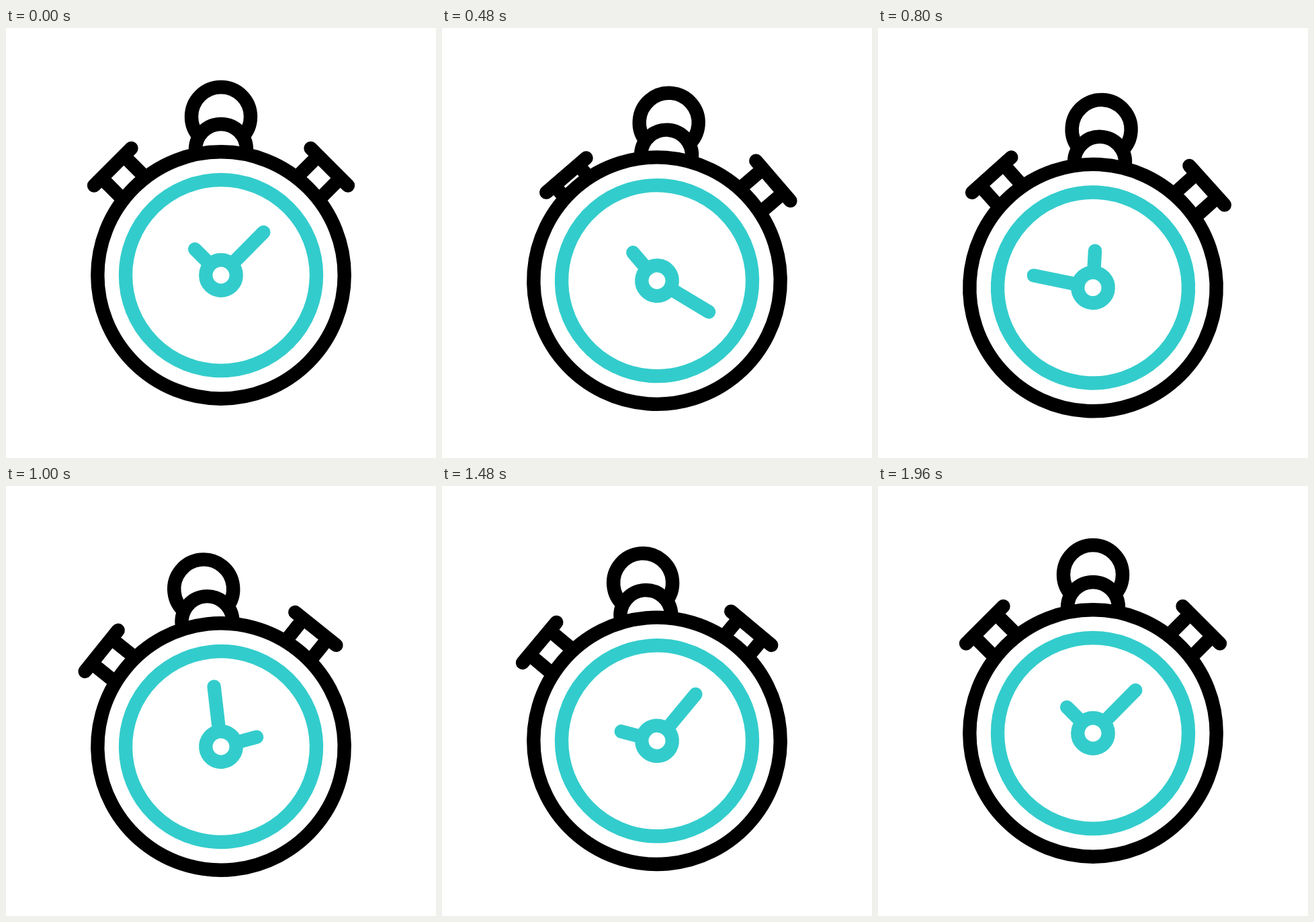
Recreate the animation shown at these times as an HTML page with a canvas. Size 640 px wide and 640 px high, loop 2000 ms.

```html
<!DOCTYPE html>
<html lang="en">
<head>
<meta charset="utf-8">
<title>Stopwatch</title>
<style>
  html, body { margin: 0; width: 100%; height: 100%; overflow: hidden; background: #fff; }
  canvas { display: block; width: 640px; height: 640px; }
</style>
</head>
<body>
<canvas id="stage" width="640" height="640"></canvas>
<script>
const ctx = document.getElementById('stage').getContext('2d');
const LOOP = 2000, STEP = 40, LINE = 20.4;
const BLACK = '#000', TEAL = '#33cccc', WHITE = '#fff';
const rad = deg => deg * Math.PI / 180;

// cubic-bezier(.5, 0, .5, 1), solved by bisection
function ease(x) {
  if (x <= 0) return 0;
  if (x >= 1) return 1;
  let lo = 0, hi = 1;
  for (let i = 0; i < 24; i++) {
    const s = (lo + hi) / 2;
    const bx = 1.5 * (1 - s) * s + s * s * s;
    if (bx < x) lo = s; else hi = s;
  }
  return lo * lo * (3 - 2 * lo);
}

// keys: [time, value] pairs
function track(t, keys) {
  let value = keys[0][1];
  for (let i = 1; i < keys.length; i++) {
    const [t0, a] = keys[i - 1], [t1, b] = keys[i];
    if (t >= t0) value = a + (b - a) * ease((t - t0) / (t1 - t0));
  }
  return value;
}

function ring(x, y, r, color, fill) {
  ctx.beginPath();
  ctx.arc(x, y, r, 0, Math.PI * 2);
  if (fill) { ctx.fillStyle = fill; ctx.fill(); }
  ctx.strokeStyle = color;
  ctx.stroke();
}

function line(x0, y0, x1, y1, color, cap = 'round') {
  ctx.lineCap = cap;
  ctx.strokeStyle = color;
  ctx.beginPath();
  ctx.moveTo(x0, y0);
  ctx.lineTo(x1, y1);
  ctx.stroke();
}

function turned(deg, draw) {
  ctx.save();
  ctx.rotate(rad(deg));
  draw();
  ctx.restore();
}

function button(deg, press) {
  turned(deg, () => {
    const y = -228 + press;
    for (const x of [-23.4, 23.4]) line(x, y, x, y + 40, BLACK, 'butt');
    line(-39.2, y, 39.2, y, BLACK);
  });
}

function crown() {
  ring(0, -236, 44, BLACK);
  ctx.lineCap = 'butt';
  ctx.beginPath();
  ctx.moveTo(-38, -180);
  ctx.lineTo(-38, -187);
  ctx.arc(0, -187, 38, Math.PI, 0);
  ctx.lineTo(38, -180);
  ctx.fillStyle = WHITE;
  ctx.fill();
  ctx.strokeStyle = BLACK;
  ctx.stroke();
}

function hand(deg, length) {
  turned(deg, () => line(0, 0, 0, -length, TEAL));
}

function render(t) {
  const drop = track(t, [[50, 0], [1000, 20], [1050, 20], [1970, 0]]);
  const tilt = track(t, [[50, 0], [650, 5], [1200, -10], [1212, -10], [1752, 0]]);
  const leftPress = track(t, [[50, 0], [450, 21], [920, 0]]);
  const rightPress = track(t, [[900, 0], [1250, 20], [1700, 0]]);
  const longTurn = track(t, [[50, 0], [1350, 360]]);
  const shortTurn = track(t, [[450, 0], [1750, 360]]);

  ctx.fillStyle = WHITE;
  ctx.fillRect(0, 0, 640, 640);
  ctx.save();
  ctx.translate(320, 368 + drop);
  ctx.rotate(rad(tilt));
  ctx.lineWidth = LINE;
  crown();
  button(-45, leftPress);
  button(45, rightPress);
  ring(0, 0, 183.7, BLACK, WHITE);
  ring(0, 0, 142, TEAL);
  hand(44.7 + longTurn, 90);
  hand(-45 + shortTurn, 55);
  ring(0, 0, 22.7, TEAL, WHITE);
  ctx.restore();
}

const start = performance.now();
function tick() {
  const t = (performance.now() - start) % LOOP;
  render(Math.floor(t / STEP) * STEP);
  requestAnimationFrame(tick);
}
tick();
</script>
</body>
</html>
```
